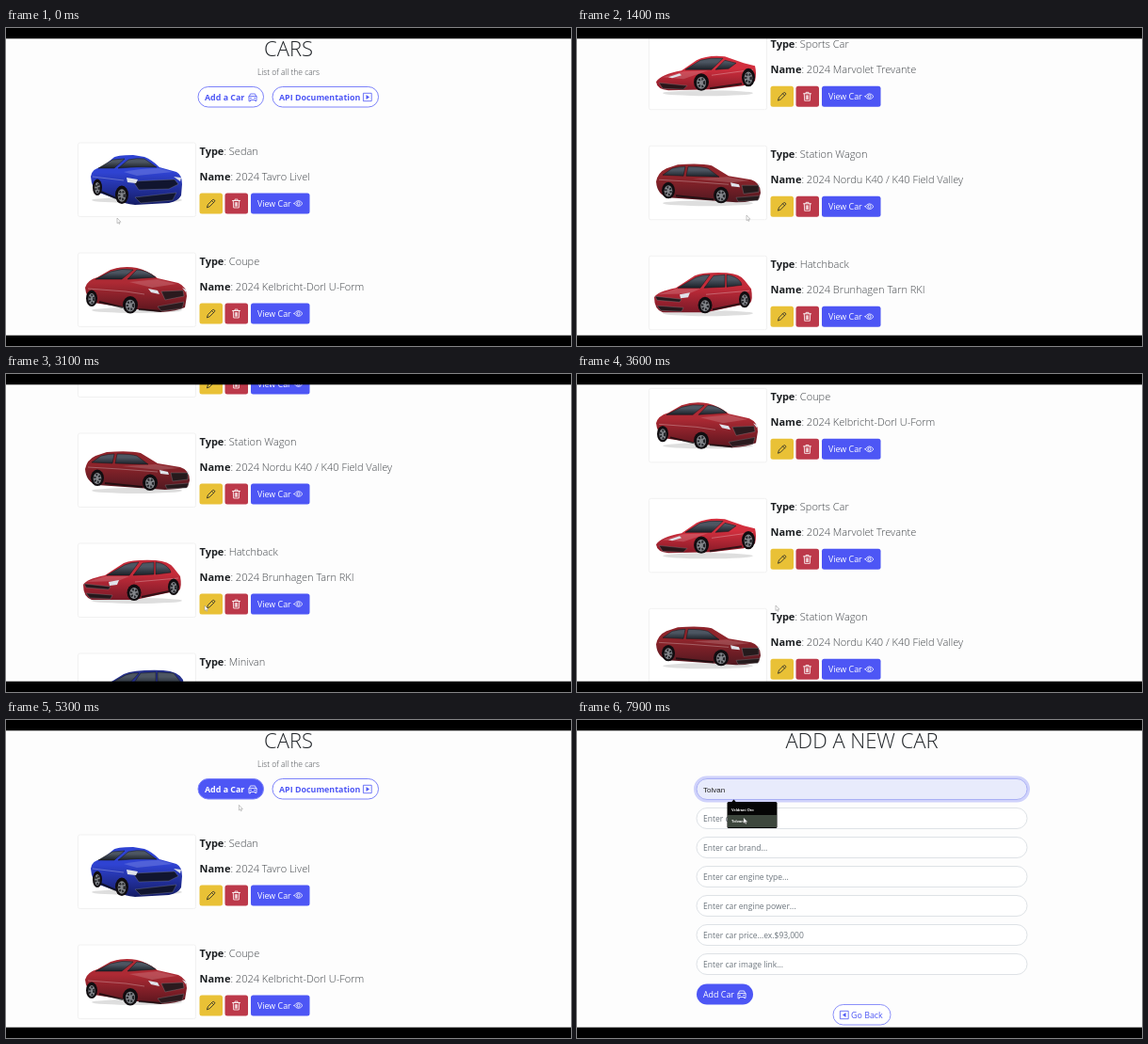
An HTML page that plays this animation: 600x338 px, repeating every 8000 ms.

```html
<!DOCTYPE html>
<html lang="en">
<head>
<meta charset="utf-8">
<title>Cars</title>
<style>
html, body { margin: 0; width: 100%; height: 100%; overflow: hidden; background: #000; }
svg { display: block; width: 100vw; height: 100vh; }
text { font-family: "Open Sans", "Noto Sans", sans-serif; }
.title { font-size: 22px; font-weight: 300; fill: #212529; text-anchor: middle; }
.sub { font-size: 8.5px; font-weight: 300; fill: #44484d; text-anchor: middle; }
.row { font-size: 11px; font-weight: 300; fill: #414549; }
.row tspan { font-weight: 700; fill: #1c1f22; }
.btn { font-size: 8.9px; fill: currentColor; }
.link { font-size: 8.9px; font-weight: 700; fill: currentColor; }
.hint { font-size: 8.5px; fill: #6c757d; }
.value { font: 8px "Liberation Sans", Arial, sans-serif; fill: #222; }
.option { font: bold 4px "Liberation Sans", Arial, sans-serif; fill: #fff; }
.icon { fill: none; stroke: currentColor; stroke-width: .8; stroke-linejoin: round; stroke-linecap: round; }
</style>
</head>
<body>
<svg id="stage" viewBox="0 0 600 338" preserveAspectRatio="none"></svg>
<script>
const LOOP = 8000, STEP = 100, ROW = 117;
const BLUE = '#4d56f5';

const cars = [
  { type: 'Sedan', name: '2024 Tavro Livel', paint: ['#2f43d2', '#141c66'], trim: '#11152f',
    body: 'M13 36Q14 27 25 26L37 16Q40 13 58 13L70 15Q78 18 86 26L104 31Q110 34 110 44L109 56Q106 62 96 64L60 66Q48 65 44 61L22 53Q14 50 13 36Z',
    glass: 'M42 27L53 18Q62 16 70 17L83 26Q62 25 42 27ZM21 27L36 18 49 17 38 27Z',
    shine: 'M48 31Q66 27 86 27L100 31 62 35Z', crease: 'M15 36L48 40', sill: 'M24 52L40 59',
    face: 'M58 41L102 39 106 44 96 49 64 50ZM60 58L104 53 100 61 66 64Z',
    lamps: 'M51 37l12 2-2 4-9-1zM101 36l8 1-1 4z', wheels: [[20, 48, 4, 8], [46, 56, 6, 9]] },
  { type: 'Coupe', name: '2024 Kelbricht-Dorl U-Form', paint: ['#ad2a34', '#5a151d'], trim: '#2b1a1e',
    body: 'M7 37Q9 29 20 26L34 18Q48 13 62 16Q74 19 84 27L106 32Q115 36 115 46L113 58Q104 62 88 63L62 60 16 53Q8 48 7 37Z',
    glass: 'M18 28L34 20Q46 16 58 18L46 28ZM52 28L62 18Q72 18 82 26Z',
    shine: 'M54 31L84 28 104 33 78 37Z', crease: 'M10 38L50 41 70 44', sill: 'M22 52L47 58M64 60L88 62',
    face: 'M88 41L111 40 112 46 92 50ZM84 57L112 52 110 59 88 62Z',
    lamps: 'M74 38l10 2 2 4-9-2zM110 37l4 2v3z', wheels: [[14, 49, 5, 8], [55, 56, 7, 8.5]] },
  { type: 'Sports Car', name: '2024 Marvolet Trevante', paint: ['#d22f3e', '#851a27'], trim: '#2a1519',
    body: 'M7 49Q12 41 34 37L50 26Q62 20 80 22L100 29 112 32Q114 40 112 48L100 53 66 57 20 58Q8 57 7 49Z',
    glass: 'M38 36L54 26Q64 23 78 24L66 36ZM70 36L80 26 92 29 84 35Z',
    shine: 'M14 44L36 38 62 37 36 46Z', crease: 'M66 42L110 36', sill: 'M64 56L98 51',
    face: 'M10 50L40 53 36 57 14 56Z',
    lamps: 'M20 44l12-4 2 2-10 3z', wheels: [[55, 50, 7, 8.5], [105, 45, 6, 9]] },
  { type: 'Station Wagon', name: '2024 Nordu K40 / K40 Field Valley', paint: ['#8e242b', '#501820'], trim: '#251a1c',
    body: 'M7 38Q9 28 18 24L30 20Q54 18 66 21L84 32 108 36Q118 39 118 50L116 57Q104 60 92 60L20 55Q8 52 7 38Z',
    glass: 'M14 31L24 24Q32 22 38 22L36 32ZM39 32L41 22Q56 22 62 24L74 33Z',
    shine: 'M46 35L82 33 106 37 86 39Z', crease: 'M10 36L44 38 84 41', sill: 'M28 53L68 57',
    face: 'M98 42L116 42 116 49 100 51ZM92 55L117 53 115 58 94 59Z',
    lamps: 'M86 39l9 2 1 3-9-1zM114 39l3 2v3z', wheels: [[20, 48, 6, 8], [76, 53, 7, 8]] },
  { type: 'Hatchback', name: '2024 Brunhagen Tarn RKI', paint: ['#c42c3a', '#791927'], trim: '#25171b',
    body: 'M5 44Q8 38 28 34L48 21Q58 17 82 18Q96 19 101 26L108 35Q110 46 107 50L60 60 14 60Q5 57 5 44Z',
    glass: 'M30 34L49 23Q56 20 64 20L54 34ZM58 34L68 21 80 20 80 33ZM82 33L82 20Q92 21 97 28L98 31Z',
    shine: 'M8 41L28 35 54 35 42 40Z', crease: 'M60 41L106 37', sill: 'M67 57L96 51',
    face: 'M6 43L34 46 32 49 8 47ZM8 53L36 55 34 59 12 58Z',
    lamps: 'M32 41l11-2-2 5-8 1z', wheels: [[59, 53, 6.5, 8], [101, 47, 5, 8]] },
  { type: 'Minivan', name: '2024 Drevlyn Orlantia', paint: ['#26318c', '#11174b'], trim: '#10142f',
    body: 'M8 42Q10 36 30 33L48 22Q60 17 90 18Q106 19 111 28L113 44 108 54 62 62 20 62Q9 59 8 46Z',
    glass: 'M32 33L50 23Q58 20 64 21L52 34ZM57 34L66 21 82 20 82 33ZM84 33L84 20 101 21 109 31Z',
    shine: 'M12 40L30 34 54 35 42 40Z', crease: 'M60 40L112 37', sill: 'M72 58L102 53',
    face: 'M9 45L32 48 30 51 11 49ZM12 55L40 58 38 61 18 61Z',
    lamps: 'M30 42l12-2-3 5-8 0z', wheels: [[65, 56, 6, 8], [107, 51, 5, 8]] },
  { type: 'Pickup Truck', name: '2023 Tavro Stonemere', paint: ['#3a3c3e', '#161718'], trim: '#08090a',
    body: 'M5 42Q8 36 30 33L42 22Q52 17 76 18L88 30 115 29 117 46 110 54 64 63 18 64Q6 62 5 50Z',
    glass: 'M32 33L44 23 56 21 50 33ZM54 33L60 21 70 20 70 32ZM72 32L72 20 76 21 84 31Z',
    shine: 'M8 39L30 34 52 34 40 39Z', crease: 'M58 40L116 35', sill: 'M76 58L104 53',
    face: 'M6 43L30 45 28 52 8 50ZM10 57L38 59 36 63 14 62Z',
    lamps: 'M30 42l10-2-2 6-8 1z', wheels: [[67, 56, 7, 9], [110, 50, 5.5, 8]] }
];
const fields = ['name...', 'type...', 'brand...', 'engine type...', 'engine power...', 'price...ex.$93,000', 'image link...'];

// Times with x, y positions of the pointer
const pointerKeys = [[0, 118, 202], [300, 180, 193], [900, 180, 193], [1900, 180, 205], [2500, 180, 205], [3000, 211, 246],
  [4500, 211, 246], [4900, 285, 160], [5400, 238, 73], [5500, 241, 77], [6000, 241, 80], [6200, 241, 82], [6600, 241, 82],
  [6900, 196, 76], [7200, 180, 78], [7500, 184, 129], [7800, 177, 104], [8000, 177, 104]];
const scrollKeys = [[0, 0], [650, 0], [900, 128.5], [1900, 567], [2150, 640], [2450, 640], [3100, 410], [4200, 0], [8000, 0]];

function at(keys, t, column) {
  const i = Math.max(1, keys.findIndex(k => k[0] >= t));
  const a = keys[i - 1], b = keys[i];
  return a[column] + (b[column] - a[column]) * (t - a[0]) / (b[0] - a[0]);
}
const ramp = (t, a, b) => Math.min(1, Math.max(0, (t - a) / (b - a)));
const mix = (a, b, k) => `rgb(${a.map((v, i) => Math.round(v + (b[i] - v) * k))})`;

const text = (cls, x, y, content) => `<text class="${cls}" x="${x}" y="${y}">${content}</text>`;
const box = (x, y, w, h, r, attrs) => `<rect x="${x}" y="${y}" width="${w}" height="${h}" rx="${r}" ${attrs}/>`;
const oval = (x, y, rx, ry, attrs) => `<ellipse cx="${x}" cy="${y}" rx="${rx}" ry="${ry}" ${attrs}/>`;
const icon = (x, y, d) => `<path class="icon" transform="translate(${x} ${y})" d="${d}"/>`;
const fade = (id, from, to) => `<linearGradient id="${id}" x1="0" y1="0" x2="0" y2="1">
  <stop offset=".35" stop-color="${from}"/><stop offset="1" stop-color="${to}"/></linearGradient>`;

const PENCIL = 'M-4 4L-3 1 2-4Q3-4.5 4-3.5 4.6-2.5 4-2L-1 3ZM1-3L3-1';
const TRASH = 'M-4-3H4M-1.5-3V-4.4H1.5V-3M-3.2-3L-2.8 4.5H2.8L3.2-3M-1.2-1V2.8M0-1V2.8M1.2-1V2.8';
const EYE = 'M-4.5 0Q0-6 4.5 0Q0 6-4.5 0ZM-1.6 0A1.6 1.6 0 1 0 1.6 0A1.6 1.6 0 1 0-1.6 0';
const CAR = 'M-4 4V0L-2.5-3.5H2.5L4 0V4H2.5V3H-2.5V4ZM-4.5-.5L-3.5-1H3.5L4.5-.5M-2.5 1H-1.5M1.5 1H2.5';
const FRAME = 'M-4.2-4.2H4.2V4.2H-4.2Z';
const arrowBox = (x, y, dir) => icon(x, y, FRAME) + `<path transform="translate(${x} ${y})" d="M${-1.5 * dir}-2.5L${2 * dir} 0 ${-1.5 * dir} 2.5Z" fill="currentColor"/>`;

const wheel = ([x, y, rx, ry]) => oval(x, y - .7, rx + 1, ry + .7, 'fill="#100d10"')
  + oval(x, y, rx * .72, ry * .75, 'fill="#83868b"')
  + oval(x, y, rx * .45, ry * .48, 'fill="none" stroke="#25272b" stroke-width="2.4" stroke-dasharray="1.8 1.6"');

function carArt(car, i) {
  return `${fade('paint' + i, ...car.paint)}
    ${oval(62, 61, 48, 3, 'fill="#bdbdbe" opacity=".5"')}
    <path d="${car.body}" fill="url(#paint${i})"/>
    <path d="${car.shine}" fill="#fff" opacity=".16"/>
    <path d="${car.crease}" fill="none" stroke="#fff" opacity=".28"/>
    <path d="${car.sill}" fill="none" stroke="#0c0a0c" stroke-width="2" opacity=".7"/>
    <path d="${car.glass}" fill="url(#glass)" stroke="#15171b" stroke-width=".5"/>
    <path d="${car.face}" fill="${car.trim}" stroke="#8a8c92" stroke-width=".35"/>
    ${car.wheels.map(wheel).join('')}
    <path d="${car.lamps}" fill="#dfe3ea"/>`;
}

function listing(car, i) {
  return `<g transform="translate(0 ${i * ROW})">
    ${box(76.5, 122, 125, 78.5, 2, 'fill="#fff" stroke="#f1f1f1"')}
    <g transform="translate(77 122)">${carArt(car, i)}</g>
    ${text('row', 205.5, 135, `<tspan>Type</tspan>: ${car.type}`)}
    ${text('row', 205.5, 162, `<tspan>Name</tspan>: ${car.name}`)}
    ${box(205.5, 175.5, 24.5, 22, 2.5, 'fill="#e9c136"')}
    ${box(232.5, 175.5, 24.5, 22, 2.5, 'fill="#bc394a"')}
    ${box(260, 175.5, 62.5, 22, 2.5, `fill="${BLUE}"`)}
    <g color="#212529">${icon(217.5, 186.5, PENCIL)}</g>
    <g color="#fff">${icon(244.5, 186.5, TRASH)}${text('btn', 267, 190, 'View Car')}${icon(310.5, 186.5, EYE)}</g>
  </g>`;
}

const listPage = `<g id="list">
  ${fade('glass', '#4d5662', '#1b2027')}
  ${text('title', 300, 30, 'CARS')}
  ${text('sub', 300, 50, 'List of all the cars')}
  <g id="addLink">${box(204, 62.5, 69.5, 21.5, 10.7, 'id="addPill" stroke="#7c82fa"')}
    ${text('link', 211, 77, 'Add a Car')}${icon(262, 73.5, CAR)}</g>
  <g color="${BLUE}">${box(283, 62.5, 112.5, 21.5, 10.7, 'fill="#fff" stroke="#7c82fa"')}
    ${text('link', 290, 77, 'API Documentation')}${arrowBox(384, 73.5, 1)}</g>
  ${cars.map(listing).join('')}
</g>`;

const formPage = `<g id="form">
  ${text('title', 302.5, 30, 'ADD A NEW CAR')}
  ${box(125.5, 61, 354, 25, 12.5, 'id="ring" fill="none" stroke="#cfd2fb" stroke-width="3"')}
  ${fields.map((label, i) => box(127, 62.5 + i * 31, 351, 22, 11, 'class="field" fill="#fff"')
    + text('hint', 134, 77 + i * 31, 'Enter car ' + label)).join('')}
  ${text('value', 134, 77, 'Tolvan')}
  <g color="#fff">${box(127, 280.5, 60, 22, 11, 'id="submit"')}${text('btn', 134, 295, 'Add Car')}${icon(175, 291.5, CAR)}</g>
  <g id="back">${box(272, 302.5, 61, 21.5, 10.7, 'id="backPill"')}${arrowBox(284, 313.5, -1)}${text('btn', 291, 317, 'Go Back')}</g>
  <g id="menu"><path d="M163.5 88L166.5 84.5 169.5 88Z"/>${box(159.5, 87, 53, 28, 1.5, 'fill="#050505"')}
    ${box(160, 101, 52, 13, 0, 'id="choice" fill="#3d473d"')}
    ${text('option', 164, 96.5, 'Veldrani Oro')}${text('option', 164, 108.5, 'Tolvan')}</g>
</g>`;

const stage = document.getElementById('stage');
stage.innerHTML = `${box(0, 0, 600, 338, 0, 'fill="#fdfdfd"')}${listPage}${formPage}
  <g id="pointer">
    <path id="arrow" d="M0 0V5.6L1.3 4.5 2.1 6.4 2.9 6 2.2 4.2H3.9Z" fill="#fff" stroke="#8c8c8c" stroke-width=".5"/>
    <path id="beam" d="M-1.2-2.8H1.2M0-2.8V2.8M-1.2 2.8H1.2" fill="none" stroke="#777" stroke-width=".6"/>
  </g>
  ${box(0, 0, 600, 11.3, 0, '')}${box(0, 326.7, 600, 11.3, 0, '')}`;

const $ = id => document.getElementById(id);
const show = (el, on) => { el.style.display = on ? '' : 'none'; };
const set = (el, attrs) => Object.entries(attrs).forEach(([k, v]) => el.setAttribute(k, v));
const inputs = [...document.querySelectorAll('.field')];
const firstHint = document.querySelector('.hint');
const chosen = document.querySelector('.value');

function render(t) {
  const onForm = t >= 6000;
  show($('list'), !onForm);
  show($('form'), onForm);
  set($('list'), { transform: `translate(0 ${-at(scrollKeys, t, 1)})` });

  const hover = t >= 5300;
  set($('addLink'), { color: hover ? '#fff' : BLUE });
  set($('addPill'), { fill: hover ? BLUE : '#fff' });

  const k = ramp(t, 6200, 6600);
  const dark = [27, 28, 31], blue = [77, 86, 245], white = [255, 255, 255];
  set($('submit'), { fill: mix(dark, blue, k) });
  set($('backPill'), { fill: mix(dark, white, k), stroke: mix(dark, [139, 144, 250], k) });
  set($('back'), { color: mix(white, blue, k) });

  const focused = t >= 6900, picked = t >= 7800;
  inputs.forEach((el, i) => set(el, {
    stroke: i === 0 && focused ? '#a9aff5' : mix([174, 170, 172], [222, 226, 230], k),
    fill: i === 0 && focused ? '#e8ebfc' : '#fff'
  }));
  show($('ring'), focused);
  show($('menu'), t >= 7200);
  show($('choice'), picked);
  show(firstHint, !picked);
  show(chosen, picked);

  const beam = (t >= 4200 && t < 4700) || (t >= 6100 && t < 7200);
  set($('pointer'), { transform: `translate(${at(pointerKeys, t, 1)} ${at(pointerKeys, t, 2)})` });
  show($('arrow'), !beam);
  show($('beam'), beam);
}

function tick(now) {
  render(Math.floor(now % LOOP / STEP) * STEP);
  requestAnimationFrame(tick);
}
render(0);
requestAnimationFrame(tick);
</script>
</body>
</html>
```
